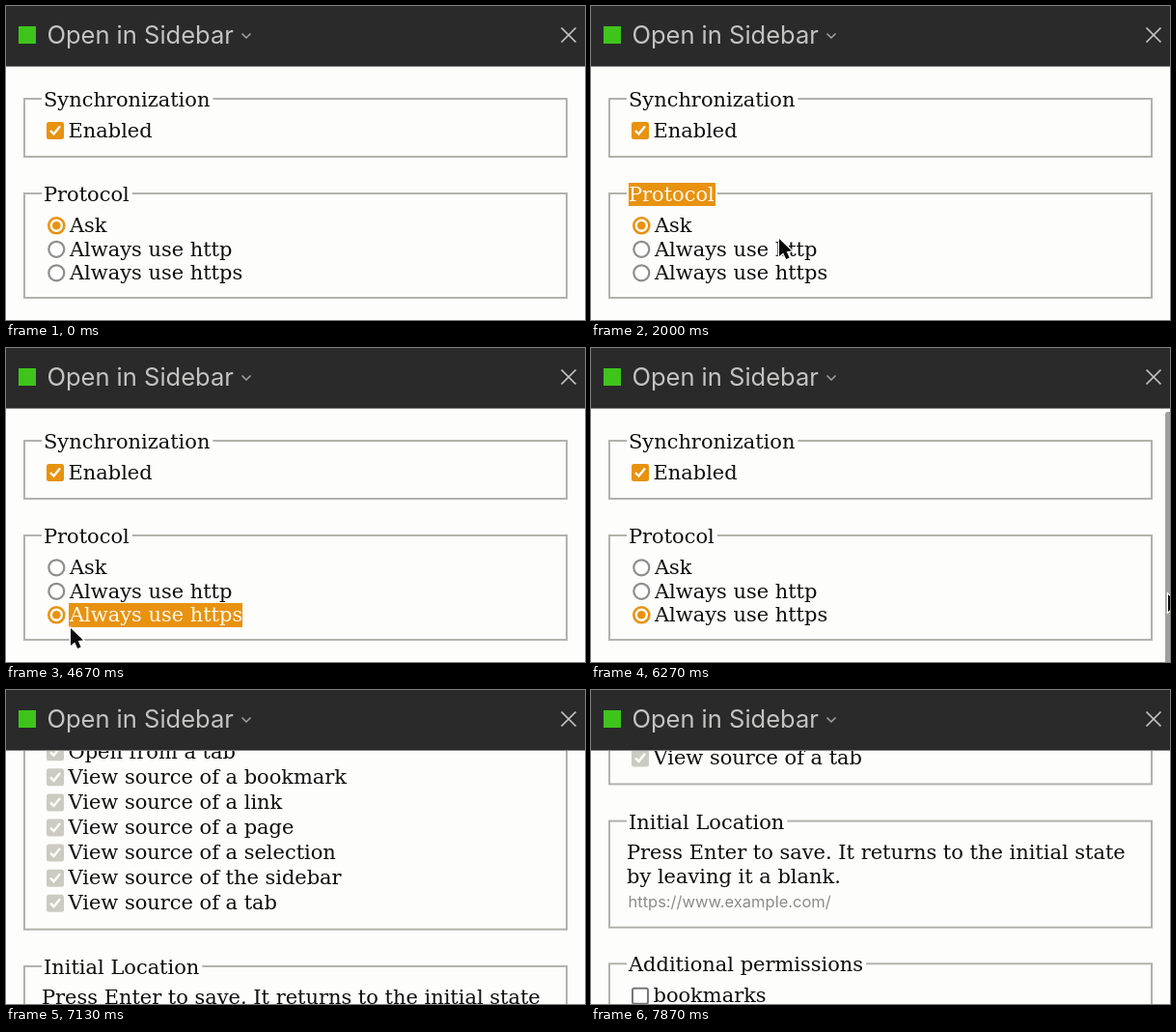
Write an HTML page with a canvas that moves like this. It is 600x325 px and loops after 8000 ms.

```html
<!DOCTYPE html>
<html lang="en">
<head>
<meta charset="utf-8">
<title>Sidebar options</title>
<style>
  html, body { margin: 0; width: 100%; height: 100%; overflow: hidden; background: #fdfdfc; }
  canvas { display: block; width: 600px; height: 325px; }
</style>
</head>
<body>
<canvas id="stage" width="600" height="325"></canvas>
<script>
const ctx = document.getElementById('stage').getContext('2d');
const LOOP = 8000, HEADER = 62;
const SERIF = '20.95px "DejaVu Serif", serif';
const ORANGE = '#e8920f', INK = '#0c0c0c', LINE = '#b2b2ac', PAPER = '#fdfdfc';

// Each key: time, x, y of the pointer tip
const POINTER = [
  [800, 300, 330], [1200, 38, 197], [1600, 130, 198], [1850, 130, 198],
  [2000, 195, 241], [2670, 250, 272], [2760, 247, 274], [3400, 64, 277],
  [3600, 64, 277], [3900, 56, 283], [4130, 52, 277], [4350, 52, 277],
  [4670, 67, 290], [5130, 75, 298], [5430, 75, 298],
  [6270, 598, 255], [6500, 604, 330]
];
const SCROLL = [[6310, 0], [6800, 356.7], [7400, 597], [7870, 663], [8000, 672]];

const PLACES = ['a bookmark', 'a link', 'a page', 'a selection', 'the sidebar', 'a tab'];
const ITEMS = ['Open from ', 'View source of '].flatMap(verb => PLACES.map(p => verb + p));

const clamp = (v, a, b) => Math.min(b, Math.max(a, v));

function pointerAt(t) {
  const i = POINTER.findIndex(k => k[0] > t);
  if (i < 1) return null;
  const [t0, x0, y0] = POINTER[i - 1], [t1, x1, y1] = POINTER[i];
  const u = (t - t0) / (t1 - t0), e = u * u * (3 - 2 * u);
  return [x0 + (x1 - x0) * e, y0 + (y1 - y0) * e];
}

// Monotone cubic through the scroll keys
function scrollAt(t) {
  const n = SCROLL.length;
  if (t <= SCROLL[0][0]) return 0;
  const i = clamp(SCROLL.findIndex(k => k[0] > t), 1, n - 1);
  const slope = j => (SCROLL[j + 1][1] - SCROLL[j][1]) / (SCROLL[j + 1][0] - SCROLL[j][0]);
  const tangent = j => {
    if (j === 0) return slope(0);
    if (j === n - 1) return slope(n - 2);
    const a = slope(j - 1), b = slope(j);
    return 2 * a * b / (a + b);
  };
  const [t0, s0] = SCROLL[i - 1], [t1, s1] = SCROLL[i];
  const h = t1 - t0, u = (t - t0) / h, v = 1 - u;
  return s0 * v * v * (1 + 2 * u) + s1 * u * u * (3 - 2 * u)
    + h * u * v * (tangent(i - 1) * v - tangent(i) * u);
}

function text(str, x, mid, color = INK, font = SERIF) {
  ctx.font = font;
  ctx.fillStyle = color;
  ctx.fillText(str, x, mid + 7);
}

function stroke(points, color, width) {
  ctx.beginPath();
  points.forEach(([x, y]) => ctx.lineTo(x, y));
  ctx.strokeStyle = color;
  ctx.lineWidth = width;
  ctx.stroke();
}

function fieldset(legend, top, bottom) {
  ctx.strokeStyle = LINE;
  ctx.lineWidth = 2;
  ctx.strokeRect(19, top, 562, bottom - top);
  ctx.font = SERIF;
  ctx.fillStyle = PAPER;
  ctx.fillRect(37, top - 3, ctx.measureText(legend).width + 5, 6);
  text(legend, 39, top + 1);
}

function checkbox(label, mid, fill) {
  ctx.beginPath();
  ctx.roundRect(42, mid - 8.5, 18, 18, 2.5);
  ctx.fillStyle = fill || '#fff';
  ctx.fill();
  if (fill) {
    stroke([[46, mid + 0.5], [49.5, mid + 4], [56, mid - 4]], '#fdfdfa', 2.4);
  } else {
    ctx.beginPath();
    ctx.roundRect(43, mid - 7.5, 16, 16, 2);
    ctx.strokeStyle = '#77777a';
    ctx.lineWidth = 2;
    ctx.stroke();
  }
  text(label, 64.5, mid);
}

function radio(label, mid, on) {
  ctx.beginPath();
  ctx.arc(52.3, mid + 0.3, 8, 0, 7);
  ctx.fillStyle = '#fff';
  ctx.fill();
  ctx.strokeStyle = on ? ORANGE : '#8e8e8c';
  ctx.lineWidth = on ? 2.6 : 2.2;
  ctx.stroke();
  if (on) {
    ctx.beginPath();
    ctx.arc(52.3, mid + 0.3, 4.3, 0, 7);
    ctx.fillStyle = ORANGE;
    ctx.fill();
  }
  text(label, 66, mid);
}

// Highlighted part of a label, between x positions a and b
function selection(str, x, mid, a, b, top, height) {
  if (b <= a) return;
  ctx.save();
  ctx.beginPath();
  ctx.rect(a, top, b - a, height);
  ctx.clip();
  ctx.fillStyle = ORANGE;
  ctx.fillRect(a, top, b - a, height);
  text(str, x, mid, '#fffbf0');
  ctx.restore();
}

function page(t, pointer) {
  const https = t >= 4330;
  fieldset('Synchronization', 96, 156);
  checkbox('Enabled', 128.5, ORANGE);

  fieldset('Protocol', 194, 302);
  radio('Ask', 227, !https);
  radio('Always use http', 251.5, false);
  radio('Always use https', 276, https);
  if (t >= 1200 && t < 2400) {
    selection('Protocol', 39, 195, 39, clamp(pointer[0], 39, 129), 183, 24);
  }
  if (t >= 2760 && t < 5130) {
    const left = t < 3400 ? clamp(pointer[0], 65, 245) : 65;
    selection('Always use https', 66, 276, left, 245, 264, 25);
  }

  fieldset('Menus', 340.5, 760.5);
  radio('Enable all', 373, true);
  radio('Disable all', 397.6, false);
  radio('Specify', 422.2, false);
  ITEMS.forEach((label, i) => checkbox(label, 446.2 + i * 26.07, '#cbcbc2'));

  fieldset('Initial Location', 798.7, 908.8);
  text('Press Enter to save. It returns to the initial state', 37, 830.7);
  text('by leaving it a blank.', 37, 856);
  text('https://www.example.com/', 38.5, 881.5, '#8b8b88', '16.5px Inter, sans-serif');

  fieldset('Additional permissions', 946.4, 1090);
  checkbox('bookmarks', 979.3);
}

function header() {
  const pale = '#c4c4c2';
  ctx.fillStyle = '#2a2a2b';
  ctx.fillRect(0, 0, 600, HEADER);
  ctx.fillStyle = '#808080';
  ctx.fillRect(0, HEADER, 600, 1);
  ctx.fillStyle = '#3fc41c';
  ctx.fillRect(13, 21, 18, 18);
  text('Open in Sidebar', 42.4, 32, pale, '25.5px Inter, sans-serif');
  stroke([[244.5, 28.5], [249, 33], [253.5, 28.5]], '#a4a4a2', 1.5);
  stroke([[575.5, 22.5], [590.5, 37.5]], pale, 1.7);
  stroke([[590.5, 22.5], [575.5, 37.5]], pale, 1.7);
}

function arrow([x, y]) {
  ctx.save();
  ctx.translate(x, y);
  ctx.beginPath();
  [[0, 0], [0, 18], [4.2, 14.4], [7.2, 21], [10.6, 19.5], [7.7, 13], [13, 12.6]]
    .forEach(([px, py]) => ctx.lineTo(px, py));
  ctx.closePath();
  ctx.lineWidth = 2.4;
  ctx.strokeStyle = '#fff';
  ctx.stroke();
  ctx.fillStyle = '#0a0a0a';
  ctx.fill();
  ctx.restore();
}

function draw(t) {
  const scroll = scrollAt(t), pointer = pointerAt(t);
  ctx.fillStyle = PAPER;
  ctx.fillRect(0, 0, 600, 325);
  ctx.save();
  ctx.translate(0, -scroll);
  page(t, pointer);
  ctx.restore();
  if (t >= 6130) {
    ctx.fillStyle = '#a0a09a';
    ctx.beginPath();
    ctx.roundRect(595, 66 + scroll * 0.507, 8, 420, 3);
    ctx.fill();
  }
  header();
  if (pointer) arrow(pointer);
}

function tick() {
  draw(performance.now() % LOOP);
  requestAnimationFrame(tick);
}
tick();
</script>
</body>
</html>
```
